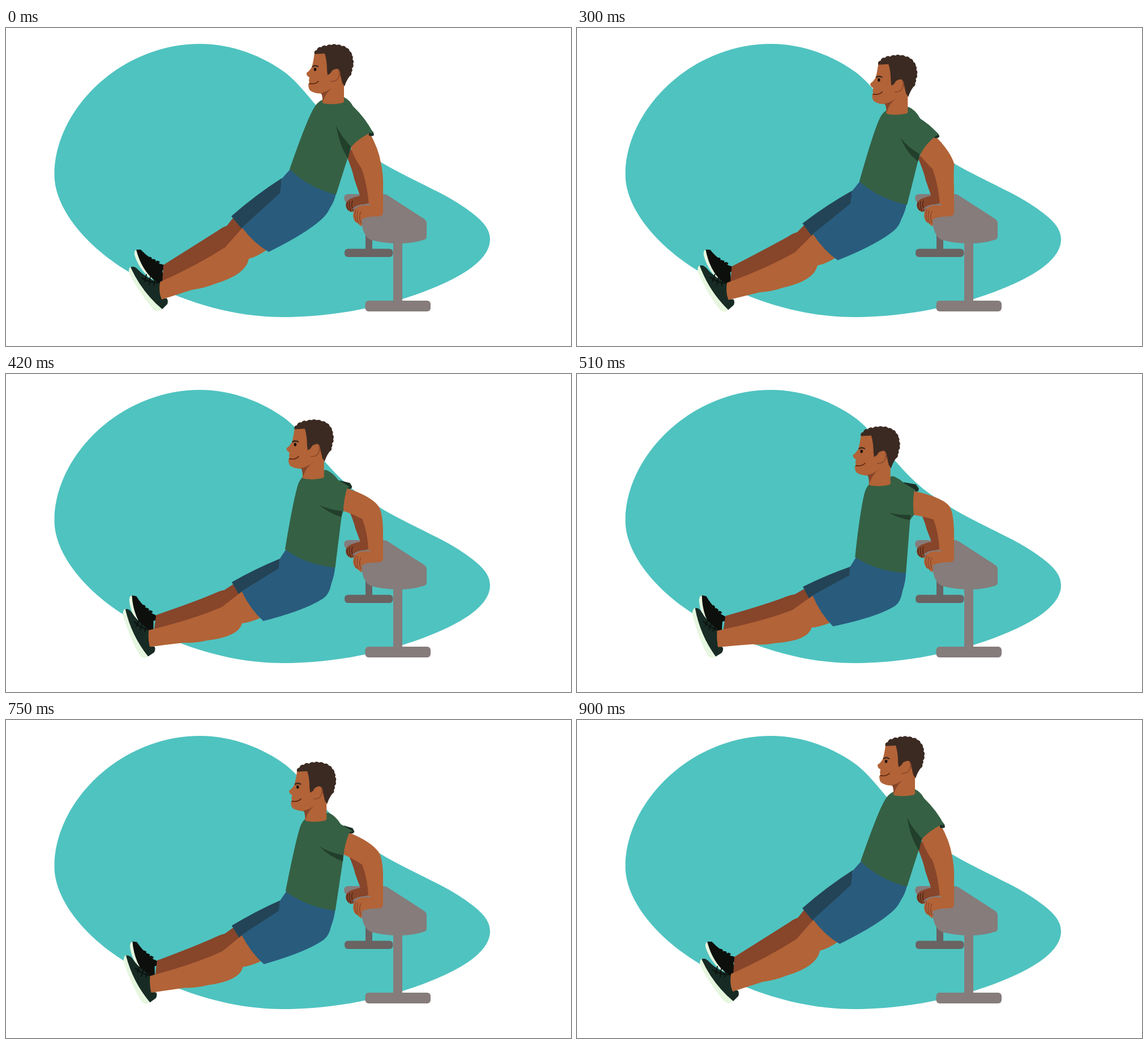
Write an HTML page that moves like this. It is 998x561 px and loops after 930 ms.

```html
<!DOCTYPE html>
<html lang="en">
<head>
<meta charset="utf-8">
<title>Bench dips</title>
<style>
  html, body { margin: 0; width: 100%; height: 100%; overflow: hidden; background: #fff; }
  svg { display: block; width: 100vw; height: 100vh; }
  .line { fill: none; stroke-linecap: round; stroke-linejoin: round; }
</style>
</head>
<body>
<svg viewBox="0 0 998 561">
  <path fill="#4fc3c0" d="M343 28C400 28 455 50 495 80C530 108 560 160 612 203C680 255 750 278 800 310C835 333 855 350 855 373C855 405 815 432 770 452C690 488 585 510 488 510C390 510 295 476 225 435C139 386 85.500 316 85.500 259C85.500 145 201 28 343 28Z"/>

  <g fill="#6b6262">
    <rect x="635" y="355" width="12" height="38"/>
    <rect x="598" y="389.500" width="85.500" height="14.500" rx="6"/>
  </g>
  <g fill="#857c7b">
    <rect x="684" y="372" width="16" height="112"/>
    <rect x="634.500" y="481" width="115.500" height="19" rx="6"/>
    <path d="M604 293L666 293Q672 293 677 297L739 337Q743 340 743 345L743 367Q743 373 737 374Q718 380 694 380Q668 380 645 374Q637 371 632 360L626 340L598 304Q595 294 604 293Z"/>
  </g>

  <path id="farArm" fill="#87452a"/>
  <path fill="#87452a" d="M625 296Q607 300 602 306Q598 312 602 319Q607 326 613 324L618 315L641 309L641 300Z"/>
  <path class="line" stroke="#4a2417" stroke-width="1.300" d="M603 308Q601 314 605 321M607 306Q605 313 609 323M612 305Q609 312 613 321"/>

  <g id="farShoe">
    <path fill="#e6f6df" d="M231 391Q226 392 227 400Q234 424 254 441L262 444L240 410Z"/>
    <path fill="#0d0f0c" d="M230 391L238 391Q250 404 264 411Q272 417 281 420Q284 425 276 428L279 445L268 450Q240 430 230 391Z"/>
    <path class="line" stroke="#0d0f0c" stroke-width="3" d="M254 405L256 406M260 409L263 410M267 412L270 413M274 418L280 420"/>
  </g>
  <path id="farLeg" fill="#87452a"/>
  <path id="farShorts" fill="#234456"/>

  <g id="nearShoe">
    <path fill="#e6f6df" d="M221 421Q215 423 218 434Q237 470 261 497Q267 502 274 498L276 494L232 430Z"/>
    <path fill="#172b24" d="M220 422Q226 419 233 426Q243 437 262 446L272 450Q274 458 273 466L275 477L284 477Q287 481 285 487L276 496Q240 466 220 422Z"/>
    <path class="line" stroke="#0b100d" stroke-width="1.800" d="M248 435L245 448M255 438L253 453M263 443L261 454M240 441Q256 451 272 449"/>
  </g>
  <path id="nearLeg" fill="#b26337"/>
  <path id="shorts" fill="#295b7d"/>

  <path id="nearArm" fill="#b26337"/>
  <path fill="#b26337" d="M641 311Q624 312 617 319Q611 327 614 336Q616 343 621 344L627 350Q630 346 628 338Q636 332 660 332L666 325Z"/>
  <path class="line" stroke="#87452a" stroke-width="1.300" d="M618 321Q614 332 619 342M622 322Q618 334 623 345M627 324Q622 333 627 344"/>
  <path class="line" stroke="#857c7b" stroke-width="2" d="M613 319Q622 310 643 312"/>

  <path id="cuff" fill="#1b2f25"/>
  <path id="shirt" fill="#356044"/>
  <path id="fold" fill="#223f2b"/>

  <g id="head">
    <path fill="#b26337" d="M545 44Q543 60 540 69Q536 76 531 79Q530 84 536 87L535 93Q537 96 534 99Q534 108 538 111Q549 117 560 115L559 128Q558 131 561 133Q578 136 595 132Q598 130 597 126L597 100L592 80L570 44Z"/>
    <path fill="#87452a" d="M579 103Q569 112 556 115L558 118L560 130Q563 115 579 103Z"/>
    <path fill="#3b2a22" d="M545 46Q543 40 549 39a6 6 0 0 1 8-5a6 6 0 0 1 9-2a7 7 0 0 1 9-2a7 7 0 0 1 9 0a7 7 0 0 1 9 2a7 7 0 0 1 8 3a7 7 0 0 1 6 6a7 7 0 0 1 4 7a6 6 0 0 1 1 7a6 6 0 0 1 1 8a6 6 0 0 1-2 8a6 6 0 0 1-1 7a6 6 0 0 1-3 7Q601 93 598 103L594 97L589 76L577 74L573 80L568 83L567 74Q567 58 563 45Z"/>
    <path fill="#b26337" d="M573 80Q578 71 586 72Q592 76 590 86Q585 96 574 94Z"/>
    <path class="line" stroke="#87452a" stroke-width="1.300" d="M574 94Q588 95 589 80M588 75L592 88"/>
    <path class="line" stroke="#3b2a22" stroke-width="2.600" d="M542 68Q546 65 551 68"/>
    <ellipse cx="546" cy="73" rx="2.300" ry="3" fill="#1d120e"/>
    <path class="line" stroke="#55230f" stroke-width="1.500" d="M536 98Q546 100 552 94"/>
  </g>
</svg>
<script>
const LOOP = 930, STEP = 30;
const el = id => document.getElementById(id);

// Depth of the dip over time: [ms, 0 = arms straight, 1 = lowest]
const depthKeys = [
  [0, 0], [120, .005], [180, .02], [240, .065], [300, .29], [360, .58], [420, .8],
  [510, .985], [540, 1], [600, .985], [690, .93], [750, .7], [810, .385], [860, .13], [900, 0], [930, 0]
];

// Depths at which the poses below are given
const ENDS = [0, 1], SWING = [0, .385, .58, 1];

const parts = {
  farArm: [
    "M600 222Q612 250 615 266L626 298L640 306L640 285L628 245L612 212Z",
    "M607 245Q615 262 618 275L627 298L641 306L640 285L630 255L612 246Z"],
  farLeg: [
    "M401 335L390 349Q383 351 375 357Q345 376 278 418L276 449Q330 425 387 388L420 354Z",
    "M401 380L385 389Q378 390 370 393Q340 405 262 427L258 452Q330 438 381 417L412 396Z"],
  farShorts: [
    "M487 265Q440 295 398 332L417 355L485 293Z",
    "M483 341Q440 356 399 376L411 399L482 357Z"],
  nearLeg: [
    "M418 352L387 387Q335 420 272 448Q269 466 275 479Q300 471 328 462Q350 459 370 451Q424 435 429 407Q442 404 460 392L440 372Z",
    "M417 391L380 417Q330 436 247 453Q246 470 249 482Q280 479 310 477Q330 479 350 475Q408 471 414 448Q428 447 446 440L432 420Z"],
  shorts: [
    "M503 248L487 266L484 291L417 352Q438 380 464 395Q533 361 560 335Q568 327 572 318Q580 306 583 292Q540 285 503 248Z",
    "M493 324L482 342L481 356L416 391Q430 424 452 446Q530 430 562 410Q572 403 575 384Q581 365 581 350Q530 350 493 324Z"],
  nearArm: [
    "M608 207Q620 192 642 184Q658 213 662 237Q667 258 666 285L666 325Q666 332 659 332L640 331L641 312Q638 275 628 248Q612 225 608 207Z",
    "M604 229Q613 207 629 192Q660 219 668 241Q664 252 666 285L666 325Q666 332 659 332L640 331L641 312Q638 275 628 249Q612 235 604 229Z",
    "M596 232Q600 212 610 195Q648 214 660 235Q667 251 666 285L666 325Q666 332 659 332L640 331L640 312Q639 281 629 255Q612 241 596 232Z",
    "M592 249Q590 228 594 207Q640 216 656 231Q666 241 666 285L666 325Q666 332 659 332L640 331L640 312Q640 285 630 257Q612 251 592 249Z"],
  cuff: [
    "M632 165L649 184L650 189Q648 192 641 190L641 185Z",
    "M615 170L634 187L637 191Q636 197 628 195L624 190Z",
    "M605 184L618 189L620 194Q619 200 610 196L606 190Z",
    "M575 191L598 195L603 202Q604 208 598 208L582 199Z"],
  shirt: [
    "M560 126Q549 131 544 141Q532 160 501 249Q534 282 583 294L604 228L610 209Q623 195 643 185L649 186Q636 160 613 138Q607 127 597 122Z",
    "M543 151Q535 157 531 167Q519 196 498 278Q532 307 583 318L602 236L605 228Q614 207 630 193L636 189Q620 175 604 167Q595 150 582 145Z",
    "M537 164Q528 169 524 181Q514 211 495 293Q530 322 582 330L598 243L597 233Q601 214 611 195L618 192Q606 185 597 180Q589 163 574 156Z",
    "M520 192Q511 197 507 212Q499 245 491 324Q528 349 581 352L588 258L595 249Q592 228 595 207L598 206Q586 198 577 193Q567 184 557 181Z"],
  fold: [
    "M583 171Q589 187 609 209L604 230Q589 208 583 171Z",
    "M568 202Q582 217 604 227L602 237Q581 226 568 202Z",
    "M555 214Q572 227 598 234L598 246Q573 235 555 214Z",
    "M551 246Q567 250 589 249L588 258Q569 256 551 246Z"]
};

const numbers = s => s.match(/-?[\d.]+/g).map(Number);
const shapes = Object.entries(parts).map(([id, poses]) => ({
  node: el(id),
  form: poses[0],
  depths: poses.length > 2 ? SWING : ENDS,
  poses: poses.map(numbers)
}));

function blend({ form, depths, poses }, p) {
  let k = 0, i = 0;
  while (k < depths.length - 2 && p >= depths[k + 1]) k++;
  const a = poses[k], b = poses[k + 1];
  const u = (p - depths[k]) / (depths[k + 1] - depths[k]);
  return form.replace(/-?[\d.]+/g, () => {
    const v = a[i] + (b[i] - a[i]) * u;
    i++;
    return v.toFixed(2);
  });
}

// Smooth curve through the keys that never overshoots
function depthAt(t) {
  const k = depthKeys, n = k.length - 1;
  const slope = i => (k[i + 1][1] - k[i][1]) / (k[i + 1][0] - k[i][0]);
  const tangent = i => {
    if (i <= 0 || i >= n) return 0;
    const l = slope(i - 1), r = slope(i);
    return l * r <= 0 ? 0 : 2 * l * r / (l + r);
  };
  let i = 0;
  while (i < n - 1 && t >= k[i + 1][0]) i++;
  const w = k[i + 1][0] - k[i][0], u = (t - k[i][0]) / w, v = 1 - u;
  return v * v * (1 + 2 * u) * k[i][1] + u * u * (3 - 2 * u) * k[i + 1][1]
    + w * u * v * (v * tangent(i) - u * tangent(i + 1));
}

function place(id, p, dx, dy, turn = 0, cx = 0, cy = 0) {
  el(id).setAttribute("transform",
    `translate(${dx * p} ${dy * p}) rotate(${turn * p} ${cx} ${cy})`);
}

function draw(now) {
  const p = depthAt(Math.floor(now % LOOP / STEP) * STEP);
  for (const s of shapes) s.node.setAttribute("d", blend(s, p));
  place("head", p, -44, 64.5);
  place("nearShoe", p, -13, -10, 14.2, 217, 428);
  place("farShoe", p, -10, -1.5, 13.5, 227, 393);
}

const start = performance.now();
function tick() {
  draw(performance.now() - start);
  requestAnimationFrame(tick);
}
tick();
</script>
</body>
</html>
```
